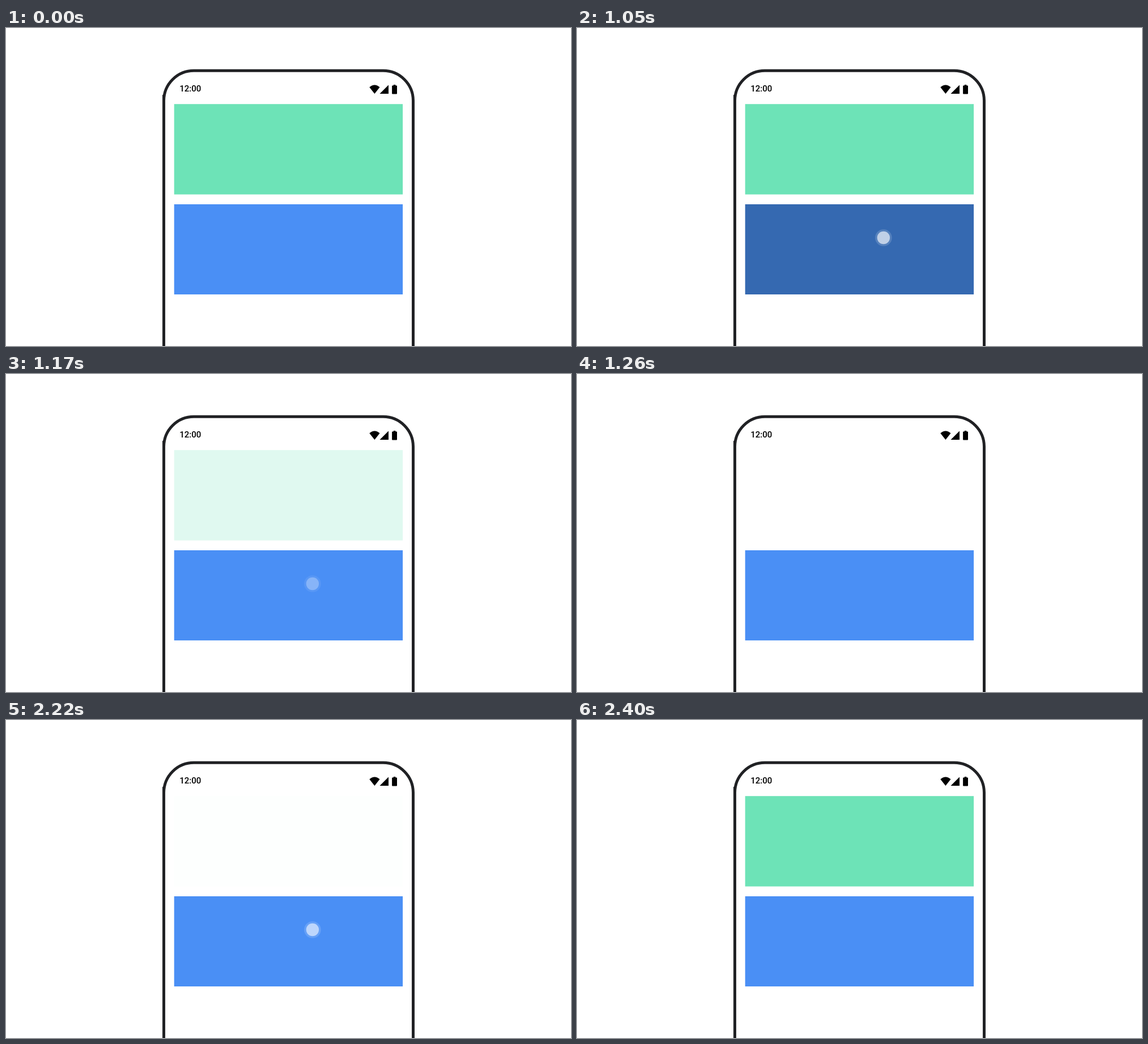
An HTML page for the animation above (3150 ms loop, 997 by 561 pixels).

```html
<!DOCTYPE html>
<html lang="en">
<head>
<meta charset="utf-8">
<title>Tap to toggle a panel</title>
<style>
  html, body { margin: 0; width: 100%; height: 100%; overflow: hidden; background: #fff; }
  svg { display: block; width: 100%; height: 100%; }
  text { font: 500 15px Roboto, sans-serif; }
</style>
</head>
<body>
<svg viewBox="0 0 997 561">
  <g fill="none" stroke="#202124" stroke-width="5">
    <path d="M278.5 570V128A53 53 0 0 1 331.5 75.2H665.5A53 53 0 0 1 718.5 128V570"/>
    <path d="M278.5 118V570"/>
  </g>
  <text x="306.3" y="111.7">12:00</text>
  <path d="M650.4 116L641.3 104.6Q650.4 96.4 659.5 104.6Z"/>
  <path d="M659.5 116H675V100.5Z"/>
  <path d="M682 101.6H683.8V100H687.3V101.6H689.1Q690 101.6 690 102.5V115.5Q690 116.4 689.1 116.4H682Q681.1 116.4 681.1 115.5V102.5Q681.1 101.6 682 101.6Z"/>
  <rect id="panel" x="296.7" y="134.2" width="403.4" height="159.4" fill="#6de3b7"/>
  <rect id="button" x="296.7" y="311" width="403.4" height="159"/>
  <g id="touch" fill="#fff" transform="translate(540.9 370)">
    <circle r="14.8" opacity=".16"/>
    <circle r="11.2" opacity=".63"/>
  </g>
</svg>
<script>
const LOOP = 3150, STEP = 30;
const taps = [
  { down: 990, dark: 1050, up: 1080, fade: 1075, end: 1260 },
  { down: 2130, dark: 2130, up: 2220, fade: 2205, end: 2400 }
];
const [panel, button, touch] = ['panel', 'button', 'touch'].map(id => document.getElementById(id));
const progress = (t, from, to) => Math.min(1, Math.max(0, (t - from) / (to - from)));

// Equivalent to cubic-bezier(.4, 0, .2, 1)
function standardEase(x) {
  let lo = 0, hi = 1;
  for (let i = 0; i < 20; i++) {
    const s = (lo + hi) / 2, r = 1 - s;
    if (1.2 * r * r * s + 0.6 * r * s * s + s ** 3 < x) lo = s; else hi = s;
  }
  return lo * lo * (3 - 2 * lo);
}

function draw(t) {
  const [hide, show] = taps.map(tap => standardEase(progress(t, tap.fade, tap.end)));
  panel.setAttribute('opacity', 1 - hide + show);

  const pressed = taps.some(tap => t >= tap.dark && t < tap.up);
  button.setAttribute('fill', pressed ? '#3569b1' : '#4a8ff5');

  const tap = taps.find(({ down, end }) => t >= down && t < end);
  const level = !tap ? 0 : t < tap.up ? 1 : 1 - progress(t, tap.fade, tap.end);
  touch.setAttribute('opacity', level);
}

const start = performance.now();
function tick() {
  const t = (performance.now() - start) % LOOP;
  draw(Math.floor(t / STEP) * STEP);
  requestAnimationFrame(tick);
}
tick();
</script>
</body>
</html>
```
